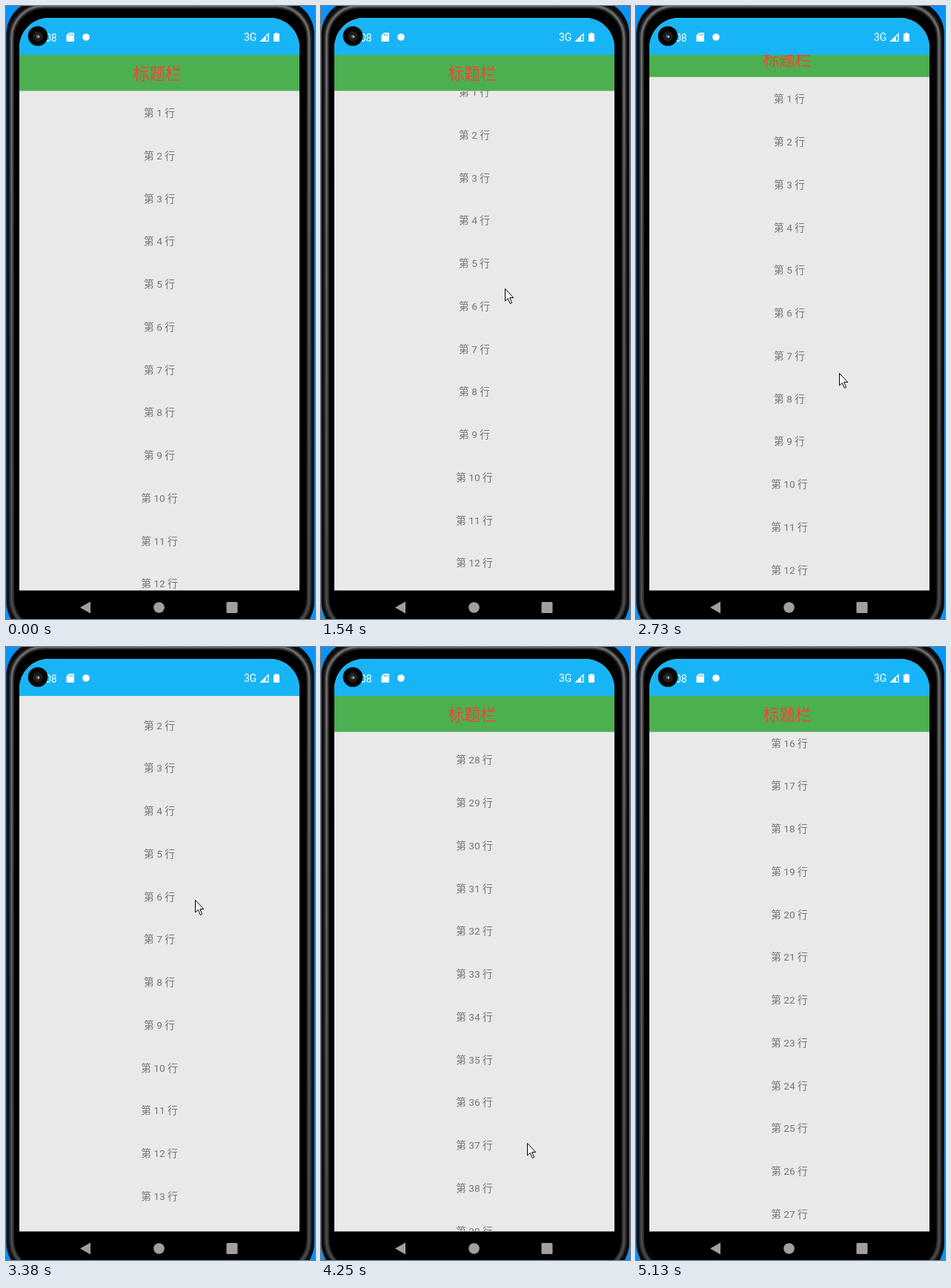
An HTML page that plays this animation: 417 px wide and 827 px high, repeating every 5.66 s.

```html
<!DOCTYPE html>
<html lang="zh">
<head>
<meta charset="utf-8">
<style>
  html, body { margin: 0; width: 100%; height: 100%; overflow: hidden; background: #0794ff; }
  svg { display: block; width: 417px; height: 827px; }
  text { font-family: Roboto, "Noto Sans CJK SC", "Noto Sans CJK", sans-serif; }
  .row { font-size: 13.7px; fill: #757575; text-anchor: middle; }
  .title { font-size: 21.7px; fill: #f44336; text-anchor: middle; }
  .status { font-size: 14px; fill: #fff; }
</style>
</head>
<body>
<svg viewBox="0 0 417 827">
  <defs>
    <linearGradient id="metal" x1="0" y1="0" x2="0" y2="1">
      <stop offset="0" stop-color="#6a6a6a"/>
      <stop offset=".5" stop-color="#555"/>
      <stop offset="1" stop-color="#484848"/>
    </linearGradient>
    <clipPath id="screen"><path d="M18 788.5V56A40 40 0 0 1 58 16H356A40 40 0 0 1 396 56V788.5Z"/></clipPath>
    <clipPath id="content"><rect x="18" y="66" width="378" height="723"/></clipPath>
    <clipPath id="listClip"><rect id="listBox" x="18" width="378" height="723"/></clipPath>
  </defs>

  <!-- phone body -->
  <rect width="417" height="827" fill="#0794ff"/>
  <rect x=".5" y="-8" width="415.5" height="858" rx="46" fill="#0b0b0b"/>
  <g fill="none">
    <rect x="7.5" y="0" width="401.5" height="843" rx="43" stroke="#2a2a2a" stroke-width="7"/>
    <rect x="7.5" y="0" width="401.5" height="843" rx="43" stroke="url(#metal)" stroke-width="3"/>
  </g>
  <rect x="11" y="4" width="394.500" height="836" rx="42" fill="#000"/>

  <!-- screen -->
  <g clip-path="url(#screen)">
    <rect x="18" y="16" width="378" height="773" fill="#e9e9e9"/>
    <g id="list" clip-path="url(#listClip)"></g>
    <g clip-path="url(#content)">
      <g id="bar">
        <rect x="18" y="66" width="378" height="48.5" fill="#4caf50"/>
        <text class="title" x="204" y="98.5">标题栏</text>
      </g>
    </g>
    <rect x="18" y="16" width="378" height="50" fill="#18b5f6"/>
  </g>

  <!-- status icons -->
  <text class="status" x="53" y="47.500">08</text>
  <path d="M85 36H91Q92 36 92 37V47Q92 48 91 48H82.500Q81.500 48 81.500 47V39.500Z" fill="#fff"/>
  <path d="M85.500 37.500V40M87.700 37.500V40M89.900 37.500V40" stroke="#18b5f6"/>
  <circle cx="108" cy="42" r="4.800" fill="#fff"/>
  <text class="status" x="321" y="47">3G</text>
  <path d="M354 37.500V47.400H344Z" fill="none" stroke="#fff" stroke-width="1.300"/>
  <path d="M343 48L351 40V48Z" fill="#fff"/>
  <path d="M363.500 36H366.500V37.200H369V48H361V37.200H363.500Z" fill="#fff"/>

  <!-- camera -->
  <circle cx="43" cy="40.5" r="13.3" fill="#050505"/>
  <circle cx="43" cy="41" r="6" fill="#1c1c1c" stroke="#2a2a2a"/>
  <circle cx="43" cy="41" r="2.600" fill="#555"/>
  <circle cx="44" cy="41.500" r="1.200" fill="#bbb"/>

  <!-- navigation -->
  <g fill="#a0a0a0">
    <path d="M100 811.500L114 803.500V819.500Z"/>
    <circle cx="206.500" cy="811.500" r="7.300"/>
    <rect x="297.500" y="804" width="15" height="15" rx="1.500"/>
  </g>

  <g id="pointer">
    <circle id="press" r="12" fill="#f2ef70"/>
    <path d="M.5 .5V17L4.300 13.500L7.300 20.500L9.700 19.400L6.700 12.600H11.800Z" fill="#fff" stroke="#000"/>
  </g>
</svg>
<script>
const LOOP = 5660, STEP = 65;
const TOP = 66, BAR = 48.5, PITCH = 57.75, END = 2166.5, STRETCH = 1.45e-5;
const $ = id => document.getElementById(id);
const linear = u => u;
const easeOut = u => 1 - (1 - u) ** 3;
const mix = (a, b, u) => a + (b - a) * u;
const clamp = (v, lo, hi) => Math.min(hi, Math.max(lo, v));

// drag: pixels the page is pulled down; the pointer rests between gestures
const GESTURES = [
  { start: 130, end: 650, drag: 0, from: [338, 691], to: [255, 454] },
  { start: 715, end: 888, drag: -158, from: [255, 440], to: [248, 257] },
  { start: 888, end: 1625, drag: 158, from: [248, 257], to: [248, 407] },
  { start: 2015, end: 2155, drag: -BAR, from: [304, 632], to: [304, 576] },
  { start: 2300, end: 3000, drag: BAR, from: [304, 576], to: [255, 444] },
  { start: 3356.4, end: 3900, drag: -BAR - END, from: [254, 327], to: [284, 645] },
  { start: 4007, end: 5070, drag: 1334.25, from: [284, 650], to: [257, 742], ease: easeOut }
];
const POINTER_OUT = 4680;

// the title bar takes each drag first, the list takes the rest
function pose(t) {
  let bar = BAR, scroll = 0, pointer = null;
  for (const { start, end, drag, from, to, ease = linear } of GESTURES) {
    if (t < start) break;
    const u = clamp((t - start) / (end - start), 0, 1);
    const pull = drag * ease(u);
    const next = clamp(bar + pull, 0, BAR);
    scroll = clamp(scroll - (pull - (next - bar)), 0, END);
    bar = next;
    pointer = from.map((v, i) => Math.round(mix(v, to[i], u)));
  }
  return { bar, scroll, pointer: t < POINTER_OUT ? pointer : null };
}

const rows = Array.from({ length: 50 }, (_, i) => {
  const row = document.createElementNS("http://www.w3.org/2000/svg", "text");
  row.setAttribute("class", "row");
  row.setAttribute("x", 207);
  row.textContent = `第 ${i + 1} 行`;
  return $("list").appendChild(row);
});

const show = (el, on) => { el.style.display = on ? "" : "none"; };

function draw(time) {
  const { bar, scroll, pointer } = pose(Math.floor(time / STEP) * STEP);
  const atEnd = scroll > END - 1;

  $("bar").setAttribute("transform", `translate(0 ${bar - BAR})`);
  $("listBox").setAttribute("y", TOP + bar);
  rows.forEach((row, i) => {
    let y = TOP + bar + 29.5 - scroll + i * PITCH;
    if (atEnd) y += STRETCH * (y - TOP) ** 2;
    show(row, y > 40 && y < 810);
    row.setAttribute("y", y + 5);
  });

  show($("pointer"), pointer);
  show($("press"), atEnd);
  if (pointer) $("pointer").setAttribute("transform", `translate(${pointer})`);
}

const start = performance.now();
function tick() {
  draw((performance.now() - start) % LOOP);
  requestAnimationFrame(tick);
}
tick();
</script>
</body>
</html>
```
